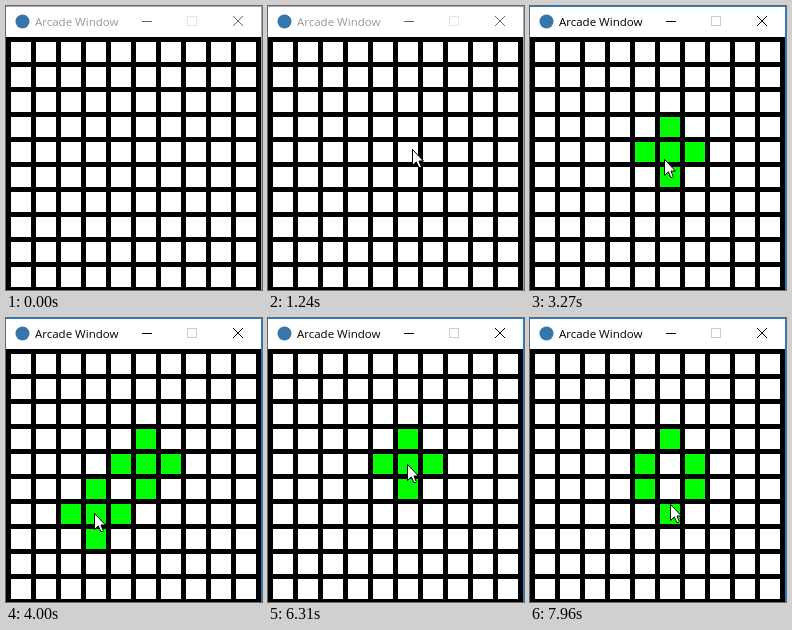
An HTML page with a canvas that plays this animation: 256x284 px, repeating every 8000 ms.

```html
<!DOCTYPE html>
<html lang="en">
<head>
<meta charset="utf-8">
<title>Arcade Window</title>
<style>
  html, body { margin: 0; width: 100%; height: 100%; overflow: hidden; background: #fff; }
  canvas { display: block; }
</style>
</head>
<body>
<canvas id="stage" width="256" height="284"></canvas>
<script>
const ctx = document.getElementById('stage').getContext('2d');
const LOOP = 8000, SIZE = 10, CELL = 20, MARGIN = 5, PITCH = CELL + MARGIN, TOP = 31;
const FOCUS_TIME = 1550;

// Each move glides the pointer tip to a new place; bow bends the way sideways.
const entry = { x: 118, y: 250 };
const moves = [
  { at: 620, lasts: 620, x: 144, y: 143, bow: 30 },
  { at: 3140, lasts: 480, x: 88, y: 195 },
  { at: 4970, lasts: 300, x: 146, y: 147 },
  { at: 5450, lasts: 100, x: 139, y: 146 },
  { at: 6450, lasts: 510, x: 145, y: 187, bow: -20 },
  { at: 7100, lasts: 270, x: 141, y: 174 },
  { at: 7900, lasts: 60, x: 140, y: 186 }
];

function pointerAt(t) {
  let { x, y } = entry;
  for (const move of moves) {
    if (t < move.at) break;
    const p = Math.min(1, (t - move.at) / move.lasts);
    const eased = p * p * (3 - 2 * p);
    x += (move.x - x) * eased + (move.bow || 0) * Math.sin(Math.PI * eased);
    y += (move.y - y) * eased;
  }
  return { x: Math.round(x), y: Math.round(y) };
}

// A click hits the cell under the pointer.
const clicks = [1580, 2270, 2890, 4000, 4790, 5720, 6310, 7620].map(time => {
  const { x, y } = pointerAt(time);
  return { time, col: Math.floor(x / PITCH), row: Math.floor((y - TOP) / PITCH) };
});

// Every click flips its cell and the four neighbours.
function isLit(col, row, t) {
  const flips = clicks.filter(click => click.time <= t &&
    Math.abs(click.col - col) + Math.abs(click.row - row) <= 1);
  return flips.length % 2 === 1;
}

function rect(color, x, y, w, h) {
  ctx.fillStyle = color;
  ctx.fillRect(x, y, w, h);
}

function line(x1, y1, x2, y2) {
  ctx.beginPath();
  ctx.moveTo(x1, y1);
  ctx.lineTo(x2, y2);
  ctx.stroke();
}

function drawTitleBar(active) {
  const border = active ? '#1883d7' : '#aaa';
  rect('#fff', 0, 0, 256, TOP);
  rect(border, 0, 0, 256, 1);
  rect(border, 255, 0, 1, 284);

  ctx.fillStyle = '#3776ab';
  ctx.beginPath();
  ctx.arc(16.5, 15.5, 7, 0, Math.PI * 2);
  ctx.fill();

  ctx.fillStyle = active ? '#000' : '#999';
  ctx.font = '11.5px "Open Sans", "Noto Sans", sans-serif';
  ctx.fillText('Arcade Window', 29, 20);

  ctx.strokeStyle = active ? '#ccc' : '#e6e6e6';
  ctx.strokeRect(181.5, 10.5, 9, 9);
  ctx.strokeStyle = active ? '#000' : '#666';
  line(136, 15.5, 146, 15.5);
  line(227, 10, 237, 20);
  line(237, 10, 227, 20);
}

function drawGrid(t) {
  rect('#000', 0, TOP, 255, 284 - TOP);
  for (let row = 0; row < SIZE; row++) {
    for (let col = 0; col < SIZE; col++) {
      rect(isLit(col, row, t) ? '#0f0' : '#fff',
        MARGIN + col * PITCH, TOP + MARGIN + row * PITCH, CELL, CELL);
    }
  }
}

const arrow = new Path2D('M.5 .5V16.5L4.3 12.9L6.8 18.5H8.5L9.2 17.5L7 12H11.5Z');

function drawPointer(t) {
  if (t < moves[0].at) return;
  const { x, y } = pointerAt(t);
  ctx.save();
  ctx.translate(x, y);
  ctx.fillStyle = '#fff';
  ctx.strokeStyle = '#000';
  ctx.fill(arrow);
  ctx.stroke(arrow);
  ctx.restore();
}

function frame() {
  const t = performance.now() % LOOP;
  drawTitleBar(t >= FOCUS_TIME);
  drawGrid(t);
  drawPointer(t);
  requestAnimationFrame(frame);
}
frame();
</script>
</body>
</html>
```
